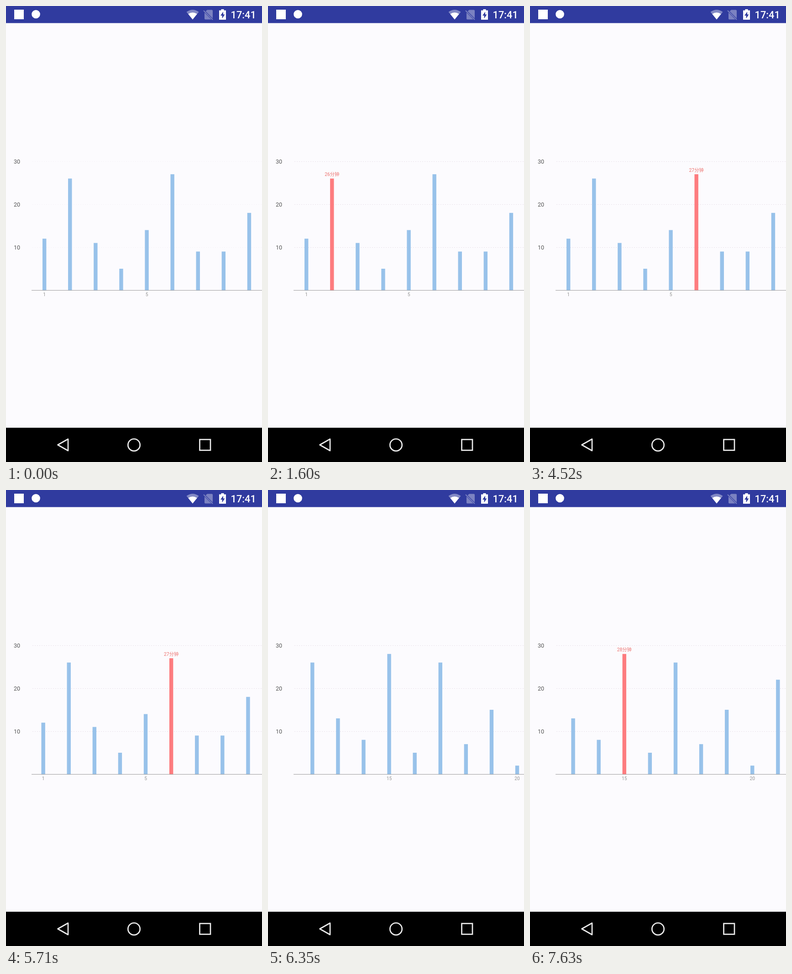
Write an HTML page that moves like this. It is 561x998 px and loops after 7990 ms.

```html
<!DOCTYPE html>
<html lang="zh-CN">
<head>
<meta charset="utf-8">
<title>Bar chart</title>
<style>
  html, body { margin: 0; height: 100%; overflow: hidden; background: #fcfbfe; }
  svg { display: block; width: 100%; height: 100%; }
  text { font-family: Roboto, "Noto Sans CJK SC", "Noto Sans CJK", sans-serif; }
  .scale { font-size: 12.5px; fill: #555; }
  .day { font-size: 10.3px; fill: #949494; text-anchor: middle; }
  .value { font-size: 10.3px; fill: #ec7370; text-anchor: middle; }
  .clock { font-size: 21.8px; font-weight: 500; fill: #fff; }
  .grid { stroke: #e7dfe8; stroke-dasharray: 2 3; animation: reveal 7990ms infinite; }
  .bar { fill: #98c2ea; }
  .bar.on { fill: #fd7c7f; }
  .nav { fill: none; stroke: #ebebeb; stroke-width: 2.7; }
  @keyframes reveal {
    0%, 6.26% { opacity: .3; }
    15.4%, 100% { opacity: 1; }
  }
</style>
</head>
<body>
<svg viewBox="0 0 561 998">
  <defs><clipPath id="plot"><rect x="56" y="300" width="505" height="360"/></clipPath></defs>
  <rect width="561" height="998" fill="#fcfbfe"/>

  <rect width="561" height="37.4" fill="#303b9f"/>
  <rect x="18" y="8" width="21" height="21" fill="#fff"/>
  <circle cx="65.5" cy="18" r="9.3" fill="#fff"/>
  <path d="M409 29.5 395.5 13Q409 3.5 422.5 13Z" fill="#fff" opacity=".4"/>
  <path d="M409 29.5 399.3 17.4Q409 11 418.7 17.4Z" fill="#fff"/>
  <g opacity=".36">
    <path d="M441 8.5h10q2 0 2 2v16.5L437.5 11.5ZM435 14.5 450 29.5H437q-2 0-2-2Z" fill="#fff"/>
    <path d="M433 10 453 30" stroke="#fff" stroke-width="1.8"/>
  </g>
  <path d="M471.5 7h6v2.5h4.5V30h-15V9.500h4.500Z" fill="#fff"/>
  <path d="M476 12.500 470 21h3.700v6.500L479.500 18.500h-3.500Z" fill="#303b9f"/>
  <text class="clock" x="492.500" y="27">17:41</text>

  <g id="scale"></g>
  <g clip-path="url(#plot)"><g id="bars"></g></g>
  <path d="M56 622.300H561" stroke="#999"/>

  <rect y="923" width="561" height="75" fill="#000"/>
  <g class="nav">
    <path d="M113.500 960.500 136 947.800V973.200Z" stroke-linejoin="round"/>
    <circle cx="280.500" cy="960.700" r="13.200"/>
    <rect x="424.500" y="948.800" width="23.500" height="23.500"/>
  </g>
</svg>
<script>
const LOOP = 7990, PITCH = 56.1, BAR = 8.4, BASE = 622, UNIT = 9.4;
const values = [12, 26, 11, 5, 14, 27, 9, 9, 18, 22, 29, 26, 13, 8, 28, 5, 26, 7, 15, 2, 22];

// [start time, selected day]
const selections = [[0, 0], [1600, 2], [2240, 6], [2880, 8], [3420, 7], [3970, 5],
  [4520, 6], [6070, 0], [6990, 17], [7630, 15]];
// [start time, scroll distance]: a drag, then a decaying fling
const scrolls = [[0, 0], [5710, 2.5], [5800, 50], [5890, 122], [5980, 222], [6070, 335.5],
  [6170, 453], [6260, 545], [6350, 604], [6440, 639], [6530, 652.8], [6620, 662.4], [6710, 662.8]];

function add(parent, tag, attrs, text = "") {
  const node = document.createElementNS("http://www.w3.org/2000/svg", tag);
  for (const key in attrs) node.setAttribute(key, attrs[key]);
  node.textContent = text;
  return parent.appendChild(node);
}

const scale = document.getElementById("scale");
const group = document.getElementById("bars");

for (const n of [10, 20, 30]) {
  const y = BASE - n * UNIT;
  add(scale, "text", { class: "scale", x: 17, y: y + 4.6 }, n);
  add(scale, "path", { class: "grid", d: `M58 ${y + 0.5}H561` });
}

const bars = values.map((value, i) => {
  const day = i + 1, x = PITCH * (day + 0.5), top = BASE - value * UNIT;
  if (day === 1 || day % 5 === 0) add(group, "text", { class: "day", x, y: 634.8 }, day);
  return {
    rect: add(group, "rect", { class: "bar", x: x - BAR / 2, y: top, width: BAR, height: BASE - top }),
    label: add(group, "text", { class: "value", x, y: top - 5.6, visibility: "hidden" }, value + "分钟")
  };
});

const stateAt = (steps, t) => steps.findLast(([start]) => start <= t)[1];

function draw(now) {
  const t = now % LOOP, selected = stateAt(selections, t);
  group.setAttribute("transform", `translate(${-stateAt(scrolls, t)} 0)`);
  bars.forEach(({ rect, label }, i) => {
    const on = i + 1 === selected;
    rect.classList.toggle("on", on);
    label.setAttribute("visibility", on ? "visible" : "hidden");
  });
}

const begin = performance.now();
function tick() {
  draw(performance.now() - begin);
  requestAnimationFrame(tick);
}
tick();
</script>
</body>
</html>
```
